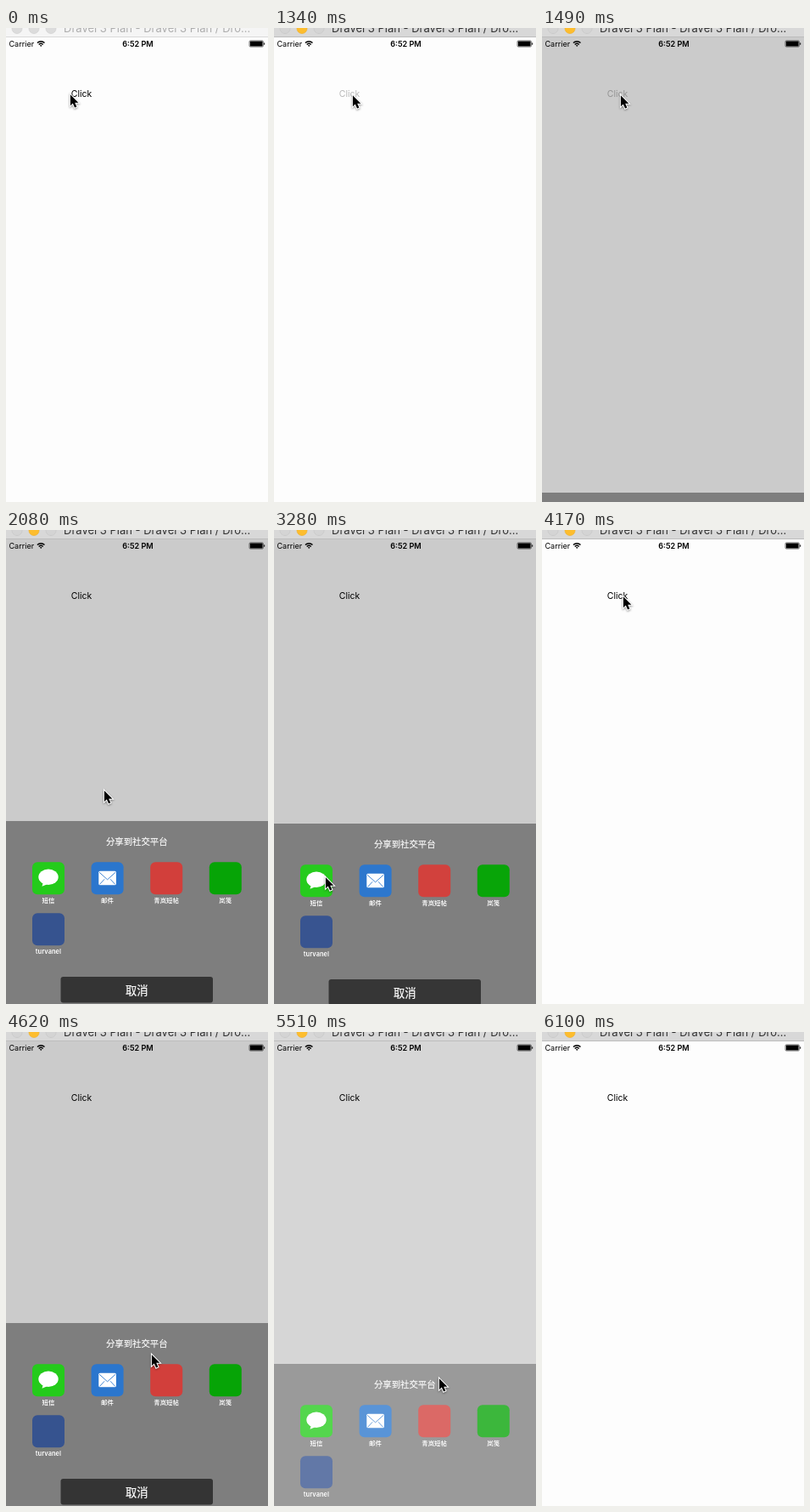
Write an HTML page that moves like this. It is 309 px wide and 557 px high and loops after 6.63 s.

```html
<!DOCTYPE html>
<html lang="zh-CN">
<head>
<meta charset="utf-8">
<title>Share sheet</title>
<style>
  html, body { margin: 0; width: 100%; height: 100%; overflow: hidden; background: #fdfdfd; }
  svg { display: block; }
  text { font-family: Inter, "Noto Sans CJK SC", "Noto Sans CJK", sans-serif; }
  .sheet text {
    fill: #fff; stroke: #fff; stroke-width: .25; text-anchor: middle;
    filter: drop-shadow(0 .7px .4px rgba(0, 0, 0, .4));
  }
  .sheet .label { font-size: 7.4px; font-weight: 700; stroke: none; }
</style>
</head>
<body>
<svg width="309" height="557" viewBox="0 0 309 557">
  <rect width="309" height="557" fill="#fdfdfd"/>
  <text id="click" x="76.8" y="81" font-size="10.5">Click</text>

  <g id="overlay">
    <rect y="11" width="309" height="546" opacity=".2"/>
    <g id="sheet" class="sheet">
      <rect width="309" height="215" fill="#7e7e7e"/>
      <text x="154.3" y="28" font-size="10.4">分享到社交平台</text>
      <g id="items"></g>
      <rect x="64.5" y="183" width="179.5" height="30.5" rx="3" fill="#343434"/>
      <text x="154.3" y="203.5" font-size="13.3">取消</text>
    </g>
  </g>

  <rect id="bar" width="309" height="10"/>
  <rect id="barLine" y="10" width="309" height="1"/>
  <g id="lights" stroke-width=".7">
    <circle cx="13" cy=".5" r="6"/>
    <circle cx="33" cy=".5" r="6"/>
    <circle cx="53" cy=".5" r="6"/>
  </g>
  <text id="title" x="68" y="5" font-size="13">Dravel 3 Plan - Dravel 3 Plan / Dro...</text>

  <text x="3.4" y="22" font-size="9.1">Carrier</text>
  <g fill="none" stroke="#000" stroke-width="1.4">
    <path d="M36.9 17.6a6 6 0 0 1 8.6 0M38.7 19.5a3.6 3.6 0 0 1 5 0"/>
    <path d="M41.2 22l-1.3-1.4a2 2 0 0 1 2.6 0z" fill="#000" stroke="none"/>
  </g>
  <text x="155.5" y="22" font-size="9.1" font-weight="600" text-anchor="middle">6:52 PM</text>
  <rect x="287" y="14.9" width="16.4" height="7.2" rx="1.2" fill="none" stroke="#000" stroke-width=".5"/>
  <rect x="287.8" y="15.6" width="14.8" height="5.8" rx=".6"/>
  <rect x="304.2" y="17.2" width="1" height="2.6" rx=".5"/>

  <path id="cursor" d="M.9 1.2V14.2L3.8 11.6 6.1 16.6 8.4 15.6 6.2 10.8H10.4z" stroke="#fff" stroke-width="2"
    paint-order="stroke" style="filter: drop-shadow(0 1px 1px rgba(0, 0, 0, .4))"/>
</svg>

<script>
const LOOP = 6630, TICK = 148.85, LAST_TICK = 41;
const SLIDE = 300, SHEET_TOP = 342, SHEET_HEIGHT = 215;
const $ = id => document.getElementById(id);

const bubble = `<ellipse cx="19" cy="17.5" rx="11.7" ry="9.2" fill="#fff"/>
  <path d="M13 23l-1.5 5.5 7.5-3z" fill="#fff"/>`;
const envelope = `<rect x="8.7" y="10.5" width="20.6" height="16.5" rx="1.5" fill="#fff"/>
  <path d="M9.5 12l9.5 8.5 9.5-8.5M10 26l5.5-6M28 26l-5.5-6" fill="none" stroke="#2b76cd" stroke-width=".9"/>`;
const items = [
  ['短信', '#24cb1b', bubble],
  ['邮件', '#2b76cd', envelope],
  ['青岚短帖', '#d23f3b', ''],
  ['岚笺', '#06a406', ''],
  ['turvanel', '#36538f', ''],
];
$('items').innerHTML = items.map(([name, color, glyph], i) => {
  const x = 31 + i % 4 * 69.6, y = 48.3 + Math.floor(i / 4) * 60;
  return `<g transform="translate(${x} ${y})">
    <rect width="38" height="38" rx="6" fill="${color}"/>${glyph}
    <text class="label" x="18.9" y="48.2">${name}</text></g>`;
}).join('');

// [tick, x, y] of the pointer tip
const pointerPath = [
  [0, 75, 77], [1, 80, 86], [2, 88, 88], [3, 92, 78], [10, 92, 78], [11, 92, 82],
  [13, 105, 220], [15, 125, 390], [16, 128, 407], [19, 60, 407], [22, 60, 407],
  [24, 68, 330], [26, 88, 150], [28, 95, 77], [29, 93, 77], [30, 112, 175],
  [31, 171, 378], [32, 188, 400], [34, 195, 406], [35, 195, 406], [37, 194, 406],
  [38, 205, 430], [40, 255, 535], [41, 275, 580],
];

function pointerAt(tick) {
  const next = Math.max(1, pointerPath.findIndex(key => key[0] >= tick));
  const [t0, x0, y0] = pointerPath[next - 1], [t1, x1, y1] = pointerPath[next];
  const k = (tick - t0) / (t1 - t0);
  return [x0 + (x1 - x0) * k, y0 + (y1 - y0) * k];
}

function slide(time, start) {
  const k = Math.min(1, Math.max(0, (time - start) / SLIDE));
  return k * k * (3 - 2 * k);
}

// The sheet slides in at full strength, then fades while sliding out.
function sheetAt(time) {
  const [open, close] = time < 4200 ? [1447, 3254] : [4290, 5416];
  const leaving = slide(time, close);
  return {
    y: Math.round(SHEET_TOP + SHEET_HEIGHT * (1 - slide(time, open) + leaving)),
    opacity: time < open ? 0 : 1 - leaving,
  };
}

function paintWindow(active) {
  $('bar').setAttribute('fill', active ? '#d8d8d8' : '#f5f5f5');
  $('barLine').setAttribute('fill', active ? '#bdbdbd' : '#dadada');
  $('title').setAttribute('fill', active ? '#333' : '#adadad');
  [...$('lights').children].forEach((light, i) => {
    const lit = active && i === 1;
    light.setAttribute('fill', lit ? '#fdbd2e' : active ? '#d4d4d4' : '#dcdcdc');
    light.setAttribute('stroke', lit ? '#f0b02c' : active ? '#c6c6c6' : '#d0d0d0');
  });
}

function draw() {
  const now = performance.now() % LOOP;
  const tick = Math.min(LAST_TICK, Math.floor((now + 3) / TICK));
  const sheet = sheetAt(tick * TICK);

  paintWindow(tick >= 9);
  $('click').setAttribute('fill', [9, 10, 29].includes(tick) ? '#b8b8b8' : '#000');
  $('overlay').setAttribute('opacity', sheet.opacity);
  $('sheet').setAttribute('transform', `translate(0 ${sheet.y})`);
  $('cursor').setAttribute('transform', `translate(${pointerAt(tick)})`);
  requestAnimationFrame(draw);
}
draw();
</script>
</body>
</html>
```
